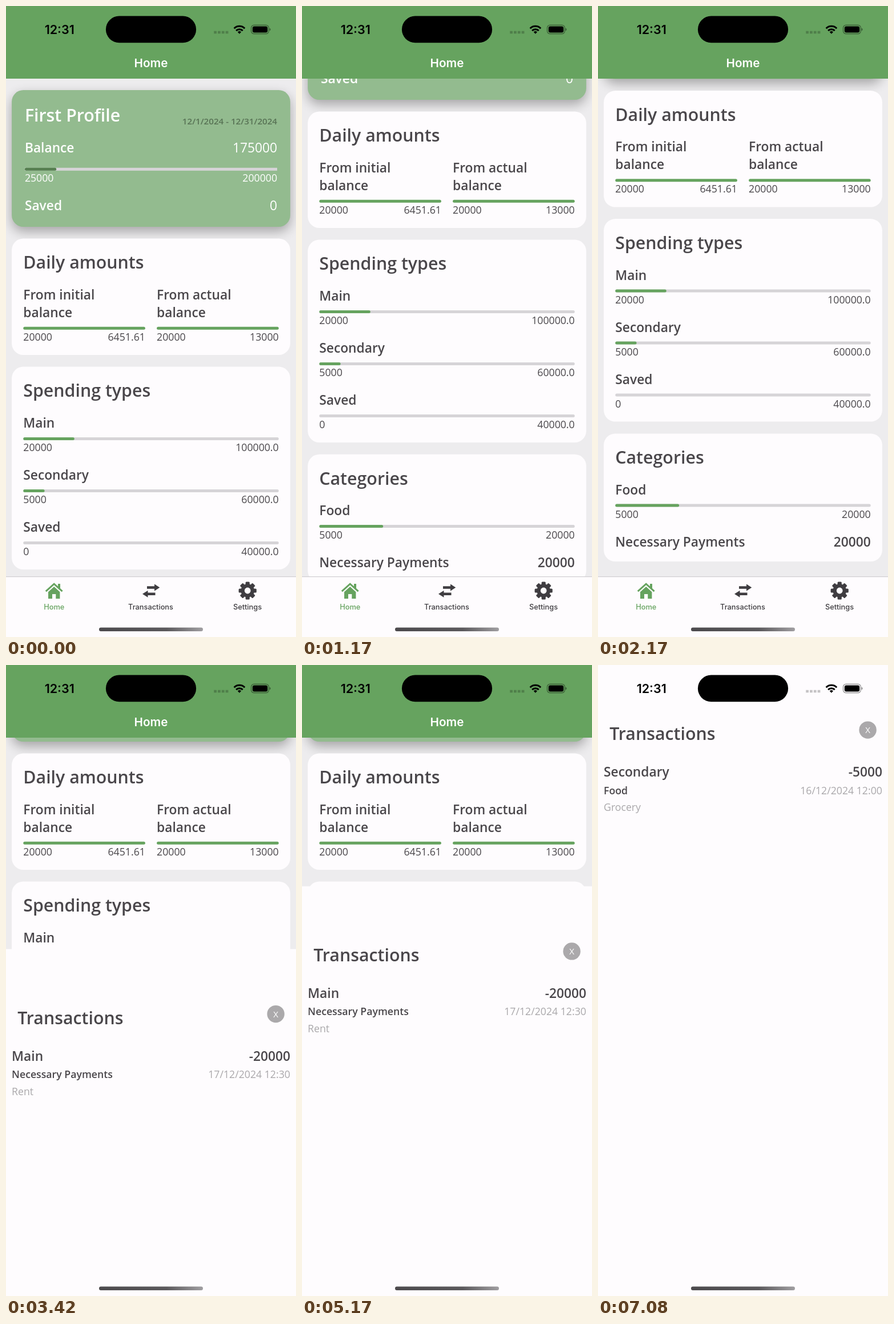
An HTML page that plays this animation: 508x1103 px, repeating every 8 s.

```html
<!DOCTYPE html>
<html lang="en">
<head>
<meta charset="utf-8">
<title>Budget app</title>
<style>
  html, body { margin: 0; width: 100%; height: 100%; overflow: hidden; background: #fefcfe; }
  svg { display: block; width: 100%; height: 100%; }
  text { font-family: "Open Sans", sans-serif; font-weight: 400; fill: #4a474b; white-space: pre; }
  .ui { font-family: Inter, sans-serif; text-anchor: middle; }
  .end { text-anchor: end; }
  .title { font-size: 30.33px; font-weight: 600; }
  .label { font-size: 22.75px; font-weight: 600; }
  .value { font-size: 22.75px; }
  .small { font-size: 17.69px; }
  .strong { font-weight: 600; }
  .faint { fill: #aaa8ab; }
  .profile text { fill: #fff; }
  .profile .date { fill: #587355; font-size: 15.16px; font-weight: 600; }
  .card { fill: #fefcfe; }
  .track { fill: #d6d4d7; }
  .accent { fill: #66a35f; }
  .ink { fill: #3f3d41; }
  .tab { font-size: 12.8px; font-weight: 500; }
</style>
</head>
<body>
<svg viewBox="0 0 508 1103">
  <defs>
    <filter id="soft" x="-20%" y="-30%" width="140%" height="160%"><feGaussianBlur stdDeviation="10"/></filter>
    <linearGradient id="pill">
      <stop offset="0" stop-color="#4c4a4d"/><stop offset=".65" stop-color="#5b595c"/><stop offset="1" stop-color="#a09ea1"/>
    </linearGradient>
  </defs>
  <rect width="508" height="1103" fill="#edecee"/>
  <g id="content"></g>

  <rect class="accent" width="508" height="127"/>
  <text class="ui" x="254" y="106.5" style="font-size:20.7px;font-weight:600;fill:#fff">Home</text>

  <rect class="card" y="998" width="508" height="105"/>
  <rect y="997" width="508" height="1.2" fill="#d0ced1"/>
  <g class="accent">
    <path d="M69.8 1023.2L84.2 1010.2L98.6 1023.2" fill="none" stroke="#66a35f" stroke-width="3"/>
    <path d="M91 1010h4v9l-4-4z"/>
    <path d="M74 1024.2L84.2 1015L94.4 1024.2V1036H87.3V1028H81V1036H74z"/>
  </g>
  <g class="ink">
    <path d="M247 1014.3h13v-3.8l9.3 6l-9.3 6v-3.8h-13z"/>
    <path d="M261.5 1025.5h-13v-3.8l-9.5 6l9.5 6v-3.8h13z"/>
  </g>
  <g id="gear" class="ink" transform="translate(423.2 1022)"></g>
  <text class="ui tab accent" x="84.3" y="1055">Home</text>
  <text class="ui tab ink" x="253.5" y="1055">Transactions</text>
  <text class="ui tab ink" x="423" y="1055">Settings</text>

  <g id="sheet">
    <rect class="card" width="508" height="1110"/>
    <text class="title" x="20.2" y="131">Transactions</text>
    <circle cx="472.6" cy="113.6" r="15.2" fill="#aba9ab"/>
    <text x="472.6" y="119.2" text-anchor="middle" style="font-size:15.16px;fill:#fff">X</text>
    <g id="rent"></g>
    <g id="grocery"></g>
  </g>

  <text class="ui" x="93.7" y="49" style="font-size:21.5px;font-weight:600;fill:#000">12:31</text>
  <rect x="174.9" y="17.6" width="158.2" height="46.6" rx="23.3"/>
  <path d="M364.2 46h26" stroke="#000" stroke-opacity=".22" stroke-width="4.6" stroke-dasharray="4.8 2"/>
  <g fill="none" stroke="#000" stroke-width="3">
    <path d="M399.6 39.2A13.2 13.2 0 0 1 418.2 39.2M403.1 43.1A8.3 8.3 0 0 1 414.7 43.1"/>
    <path d="M405.8 45.4a4.5 4.5 0 0 1 6.2 0L408.9 48.8z" fill="#000" stroke="none"/>
  </g>
  <rect x="429.5" y="33.3" width="30.8" height="15.4" rx="5" fill="none" stroke="#000" stroke-opacity=".45" stroke-width="1.2"/>
  <rect x="431.8" y="35.5" width="26.4" height="11" rx="3.2"/>
  <path d="M461.6 38.6q2 .8 2 2.4t-2 2.4z" fill-opacity=".45"/>
  <rect x="163" y="1086.5" width="182" height="6.4" rx="3.2" fill="url(#pill)"/>
</svg>
<script>
const $ = id => document.getElementById(id);
const LEFT = 30.3, RIGHT = 477.7;      // card content
const OUTER = 10.1, WIDE = 487.8;      // card edge and width

const text = (x, y, cls, str) => `<text class="${cls}" x="${x}" y="${y}">${str}</text>`;
const bar = (x, y, w, cls, rx = 2.5) =>
  `<rect class="${cls}" x="${x}" y="${y - 2.5}" width="${w}" height="5" rx="${rx}"/>`;
const panel = (top, height, attrs) =>
  `<rect x="${OUTER}" y="${top}" width="${WIDE}" height="${height}" rx="20.2" ${attrs}/>`;
const card = (top, bottom, title) =>
  panel(top, bottom - top, 'class="card"') + text(LEFT, top + 52.7, 'title', title);
const range = (x1, x2, y, from, to) =>
  text(x1, y, 'small', from) + text(x2, y, 'small end', to);

// Label, progress bar and the amounts below it.
const progress = (y, name, share, from, to) =>
  text(LEFT, y, 'label', name) +
  bar(LEFT, y + 19.5, RIGHT - LEFT, 'track') +
  (share ? bar(LEFT, y + 19.5, (RIGHT - LEFT) * share, 'accent') : '') +
  range(LEFT, RIGHT, y + 41.1, from, to);

const daily = (x, name, to) =>
  text(x, 512.7, 'label', name) + text(x, 543.6, 'label', 'balance') +
  bar(x, 563.2, 213.6, 'accent') + range(x, x + 213.6, 584.8, '20000', to);

const profile = '<g class="profile">' +
  panel(155, 239, 'opacity=".3" filter="url(#soft)"') +
  panel(147, 239, 'fill="#93bb8f"') +
  text(32.9, 202.2, 'title', 'First Profile') + text(475, 206.5, 'date end', '12/1/2024 - 12/31/2024') +
  text(32.9, 256, 'label', 'Balance') + text(475, 256, 'value end', '175000') +
  bar(32.9, 285.3, 442.1, 'track', 0) +
  '<rect x="32.9" y="282.8" width="55.3" height="5" rx="2.5" fill="#567f50"/>' +
  range(32.9, 475, 306.9, '25000', '200000') +
  text(32.9, 357, 'label', 'Saved') + text(475, 357, 'value end', '0') + '</g>';

$('content').innerHTML = profile +
  card(406.5, 610, 'Daily amounts') +
  daily(LEFT, 'From initial', '6451.61') + daily(264.1, 'From actual', '13000') +
  card(630.5, 985, 'Spending types') +
  progress(737, 'Main', .2, '20000', '100000.0') +
  progress(828, 'Secondary', 1 / 12, '5000', '60000.0') +
  progress(919, 'Saved', 0, '0', '40000.0') +
  card(1005.8, 1229.5, 'Categories') +
  progress(1112, 'Food', .25, '5000', '20000') +
  text(LEFT, 1203, 'label', 'Necessary Payments') + text(RIGHT, 1203, 'label end', '20000');

const entry = (type, amount, category, date, note) =>
  text(OUTER, 195, 'label', type) + text(OUTER + WIDE, 195, 'label end', amount) +
  text(OUTER, 225.5, 'small strong', category) + text(OUTER + WIDE, 225.5, 'small faint end', date) +
  text(OUTER, 255, 'small faint', note);
$('rent').innerHTML = entry('Main', '-20000', 'Necessary Payments', '17/12/2024 12:30', 'Rent');
$('grocery').innerHTML = entry('Secondary', '-5000', 'Food', '16/12/2024 12:00', 'Grocery');

$('gear').innerHTML = [0, 45, 90, 135].map(a =>
  `<rect x="-3.6" y="-15.6" width="7.2" height="31.2" rx="1.5" transform="rotate(${a})"/>`).join('') +
  '<circle r="11.8"/><circle class="card" r="5.4"/>';

// Times below are in ticks of a 12 per second clock.
const FPS = 12, LOOP = 8000, HEIGHT = 1103, END = 252;
const dragPath = [[5, 0], [6, 10], [8, 68], [10, 131.7], [12, 188], [13, 209], [14, 222],
  [15, 222], [16, 232], [18, 272], [19, 282], [22, 282]];
const nudgePath = [[68, END], [70, END + 4], [73, END]];

function along(path, k) {
  if (k <= path[0][0]) return path[0][1];
  for (let i = 1; i < path.length; i++) {
    const [k0, v0] = path[i - 1], [k1, v1] = path[i];
    if (k <= k1) return v0 + (v1 - v0) * (k - k0) / (k1 - k0);
  }
  return path[path.length - 1][1];
}

// Remaining distance of a critically damped spring.
const spring = x => x <= 0 ? 1 : (1 + x) * Math.exp(-x);
const slide = (k, start, phase) => k < start ? 1 : spring(phase + 18.26 * (k - start) / FPS);

function scrollAt(k) {
  if (k <= 22) return along(dragPath, k);
  if (k <= 30) return END + 30 * spring(10 * (k - 22.5) / FPS);
  return along(nudgePath, k);
}

function sheetAt(k) {
  const rest = k < 62 ? slide(k, 41, 1.843) : k < 79 ? 1 - slide(k, 62, 1.237) : slide(k, 79, .6);
  const y = rest * HEIGHT;
  return y < .8 ? 0 : k > 66 && k < 79 ? HEIGHT : y;
}

function draw(now) {
  const k = Math.floor((now % LOOP + 4) * FPS / 1000);
  $('content').setAttribute('transform', `translate(0 ${-scrollAt(k).toFixed(1)})`);
  $('sheet').setAttribute('transform', `translate(0 ${sheetAt(k).toFixed(1)})`);
  $('rent').style.display = k < 70 ? '' : 'none';
  $('grocery').style.display = k < 70 ? 'none' : '';
}

const begin = performance.now();
function loop() {
  draw(performance.now() - begin);
  requestAnimationFrame(loop);
}
loop();
</script>
</body>
</html>
```
